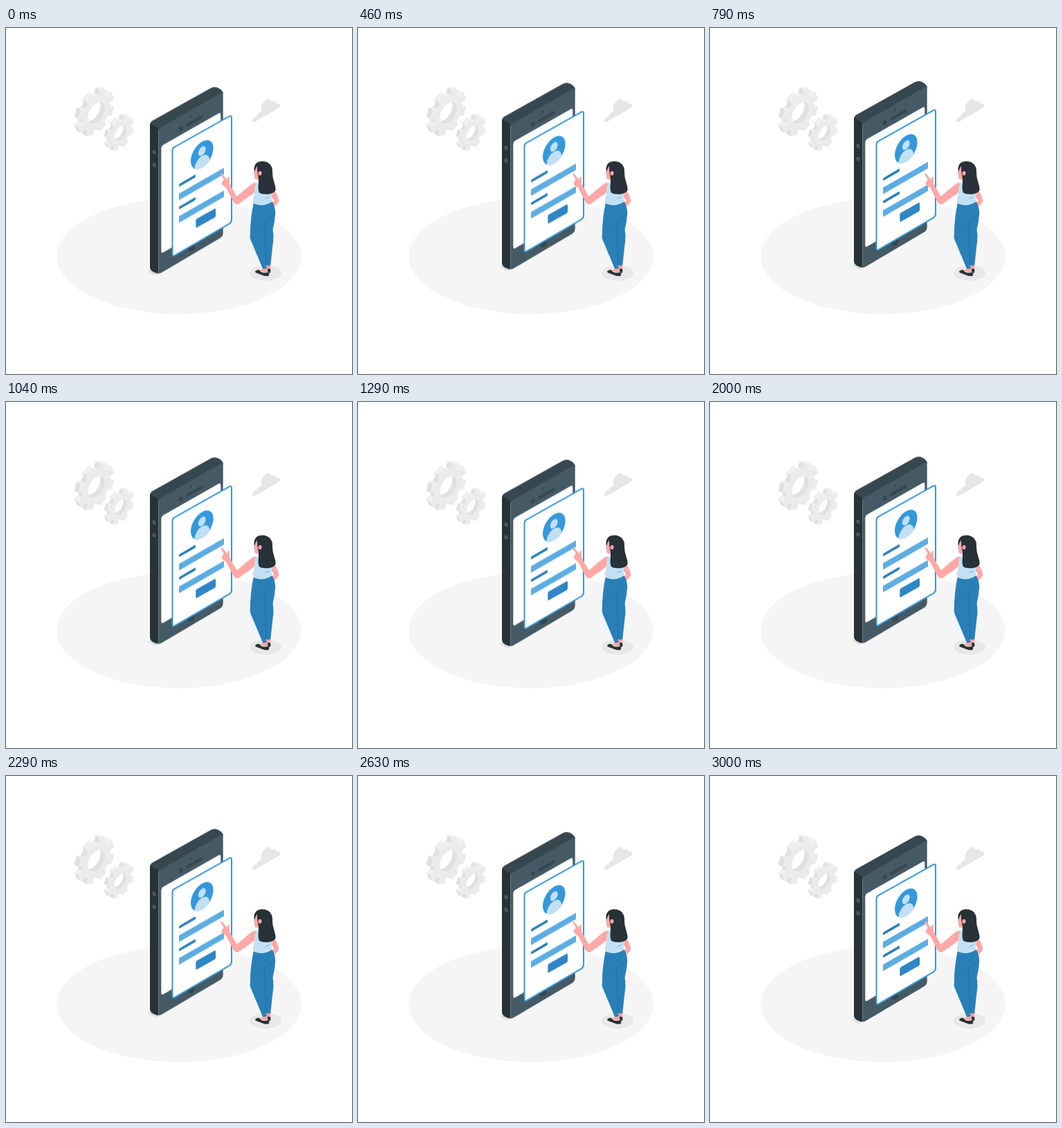
Animation, 500 px wide and 500 px high, one loop 3040 ms. Source, as an HTML page:

```html
<!DOCTYPE html>
<html lang="en">
<head>
<meta charset="utf-8">
<title>Mobile sign-in</title>
<style>
  html, body { margin: 0; width: 100%; height: 100%; overflow: hidden; background: #fff; }
  svg { display: block; width: 100vw; height: 100vh; }
</style>
</head>
<body>
<svg viewBox="0 0 500 500">
  <defs>
    <clipPath id="disc"><circle r="18.8"/></clipPath>
  </defs>

  <ellipse cx="249.8" cy="330" rx="176.7" ry="83.5" fill="#f5f5f5"/>
  <ellipse cx="375" cy="354" rx="23" ry="11" fill="#e8e8e8"/>
  <g id="gears"></g>
  <path fill="#e6e6e6" d="M356.3 136Q355.5 131.500 359.500 128.500Q362.500 127.500 363.300 126Q365 121.500 369.200 121.500Q367.700 114 370.500 109.500Q374.500 103.500 379.500 103Q382.800 103 383.500 107Q387 104.500 390.500 107.500Q391 108.700 391 109.700Q394.800 108.300 396.200 111Q396.500 114 392.500 116.500L361.500 134.500Q358 136.300 356.300 136Z"/>

  <g id="phone">
    <path fill="#e0e0e0" d="M205 352.300L209 349.500L222 355.500L215.500 358Z"/>
    <path fill="#37474f" d="M208 141Q208 136.500 211.500 134.500L296 87.300Q301.500 84.300 307 87.300Q313.500 90.500 313.700 95.500L221 148Z"/>
    <path fill="#263238" d="M208 138.500L220.500 146V355.200Q216.500 355 212.500 352.700Q208 350 208 346Z"/>
    <path fill="#455a64" d="M220.500 146L313.700 92.700V296Q313.700 301.500 309.500 304L227 352.700Q222.500 355.300 220.500 355.200Z"/>
    <g fill="#455a64">
      <ellipse cx="214" cy="179.700" rx="2.500" ry="3.300" transform="rotate(-25 214 179.700)"/>
      <ellipse cx="214" cy="198.300" rx="2.500" ry="3.300" transform="rotate(-25 214 198.300)"/>
    </g>
    <path fill="#fff" d="M224.300 175Q224.300 171 227.500 169.200L307.500 123.700Q310.300 122.300 310.300 125.500V273Q310.300 276.500 307.300 278.300L227.300 324.800Q224.300 326.300 224.300 323.500Z"/>
    <g fill="#37474f">
      <ellipse cx="252.700" cy="145.800" rx="2.800" ry="3.700" transform="rotate(25 252.700 145.800)"/>
      <ellipse cx="267" cy="128" rx="1.400" ry="1.800"/>
      <path d="M262 140.700L282.700 128.800" stroke="#37474f" stroke-width="4.200" stroke-linecap="round"/>
      <ellipse cx="267" cy="317.500" rx="5.600" ry="5.800" transform="rotate(25 267 317.500)"/>
    </g>

    <path fill="#fff" stroke="#3498db" stroke-width="2" d="M240.500 177.500Q240.500 174.300 243.300 172.700L323 128Q326 126.500 326 129.800V277.500Q326 281.300 323 283.200L243.500 329.300Q240.500 330.700 240.500 327.500Z"/>
    <g transform="matrix(.866 -.5 0 1 283.300 183.500)">
      <circle r="18.800" fill="#3498db"/>
      <g clip-path="url(#disc)" fill="#c2e0f4">
        <circle cy="-5.200" r="6.200"/>
        <circle cy="14.300" r="12.500"/>
      </g>
    </g>
    <g fill="#2980b9">
      <path id="label" d="M250 227.500Q250 226 251.300 225.200L272.700 212.800Q274 212.200 274 213.500V215Q274 216.300 272.700 217L251.300 229.300Q250 230 250 228.700Z"/>
      <use href="#label" y="32.800"/>
      <path fill="#2e86c6" d="M274.300 278.800Q274.300 277 276 276L301.300 261.700Q303 261 303 262.800V271.800Q303 273.500 301.300 274.500L276 288.700Q274.300 289.500 274.300 287.700Z"/>
    </g>
    <g fill="#5dade2">
      <path id="field" d="M250 239.800L315 202.500V211.700L250 249.200Z"/>
      <use href="#field" y="32.700"/>
    </g>
  </g>

  <g id="woman">
    <g fill="#ffa8a7">
      <path d="M373 343L382.500 341L382 351L376 354L366 350.500Q371.500 350 373 343Z"/>
      <path d="M384.500 234Q390 236 391.500 240.500L394.400 248.800Q394.700 251 392.500 253.500L387.500 258.500L384 253L387.500 249L383 243Z"/>
      <path d="M310.200 211.600Q310.800 209.500 312.700 210.800L319.200 219L320.800 215.500Q321.800 214.200 322.900 215.300L323 224.500L333.500 243.200L352.500 227.500Q357 223.300 362 223.300L362 235Q359.500 238.500 355 240.800L336.500 254Q332.500 256.300 329.500 252.500L318.500 231.500L312.500 226.700Q311 224.500 312 222.500L314.800 219.300Z"/>
      <path d="M362.500 197.500Q359 203 359 207L357.700 210.600L358.900 212Q358.500 218.500 361.500 219.300Q363.500 219.500 364.800 218.700L364.500 226L377 228L374 202Z"/>
    </g>
    <path fill="#263238" d="M378 347.500L382.300 348.500Q382.800 352 381.500 354L378.500 353.500Z"/>
    <path fill="#263238" d="M360 351.800Q362.500 349 366.300 349.800Q367.500 353 372.500 353.700Q377.500 354.200 379.700 352.700Q380.800 355.500 379.500 358.200Q375 359.300 370 357L362 354Q360 353.200 360 351.800Z"/>
    <path fill="#2980b9" d="M357.700 253Q371 259.500 384.500 250.500Q389.500 259 389.200 268.500Q388.500 279 385.500 291.500Q387.500 302 385.500 313L382.300 342.500Q378.500 344.300 375.500 342.500L377 347Q374 348.800 371 347.700Q364 331 353.500 306Q352 302.500 352.800 298Q353 276 357.700 253Z"/>
    <path fill="none" stroke="#216a9b" stroke-width=".8" d="M385.500 271Q377 272.500 373.500 279Q371.500 286 374 294L375 309L376 342"/>
    <path fill="#c2e0f4" d="M361.500 223.500Q358.500 230 359.500 239Q356.500 246 357.300 253.500Q371 259.500 384.500 251Q382.500 245 386.500 235L378 224Z"/>
    <path fill="#3498db" d="M371 247.700Q376.500 247 380.300 243.300Q379.500 247 371 247.700Z"/>
    <path fill="#263238" d="M359.200 199.500Q360.500 195 365.500 193.300Q374 190.800 380.500 196Q385 200 385 207Q384.700 214.500 387.500 223Q390.300 231.500 389.300 235Q386.500 239.500 378.500 240.200Q370 240.500 366 238Q364 234.500 364.800 226Q365.300 221 364.800 216.500Q363.300 211 362.800 199.500Q360.300 203 359 208Q357.800 204 359.200 199.500Z"/>
    <ellipse cx="367" cy="210" rx="2.500" ry="3.200" transform="rotate(15 367 210)" fill="#ffa8a7"/>
  </g>
</svg>

<script>
  const iso = (x, y, c) => [c.x + 0.866 * x, c.y + y - 0.5 * x];
  const toPath = pts => "M" + pts.map(p => p.map(v => v.toFixed(2)).join(" ")).join("L") + "Z";
  const shape = (pts, fill) => `<path d="${toPath(pts)}" fill="${fill}"/>`;

  // Eight flat teeth around a root circle.
  function gearOutline(c) {
    const pts = [];
    for (let i = 0; i < 8; i++) {
      const mid = (i + 0.5) * Math.PI / 4;
      const corners = [[-0.25, 0.77], [-0.19, 1], [0.19, 1], [0.25, 0.77], [0.39, 0.76]];
      for (const [a, k] of corners) {
        pts.push(iso(Math.cos(mid + a) * c.r * k, Math.sin(mid + a) * c.r * k, c));
      }
    }
    return pts;
  }

  const ring = (c, r) => Array.from({ length: 48 }, (_, i) => {
    const a = i * Math.PI / 24;
    return iso(Math.cos(a) * r, Math.sin(a) * r, c);
  });

  function gear(c, id) {
    const back = ([x, y]) => [x - c.d * 0.866, y - c.d * 0.5];
    const face = gearOutline(c);
    const sides = face.map((p, i) => {
      const q = face[(i + 1) % face.length];
      const ex = q[0] - p[0], ey = q[1] - p[1];
      const visible = ex * 0.5 - ey * 0.866 > 0;
      const top = ex > Math.abs(ey) * 0.6;
      return visible ? shape([p, q, back(q), back(p)], top ? "#f0f0f0" : "#e0e0e0") : "";
    }).join("");
    const hole = ring(c, c.hole);
    return `<clipPath id="${id}"><path d="${toPath(hole)}"/></clipPath>` + sides +
      shape(face, "#ebebeb") + shape(hole, "#e0e0e0") +
      `<g clip-path="url(#${id})">${shape(hole.map(back), "#fff")}</g>`;
  }

  document.getElementById("gears").innerHTML =
    gear({ x: 130.5, y: 122.5, r: 30.5, hole: 14, d: 7 }, "bigHole") +
    gear({ x: 165.5, y: 152, r: 22.8, hole: 10, d: 5.5 }, "smallHole");

  document.getElementById("phone").animate(
    [0, -10, 0].map(y => ({ transform: `translateY(${y}px)` })),
    { duration: 1520, delay: -40, iterations: Infinity, easing: "linear" }
  );
</script>
</body>
</html>
```
